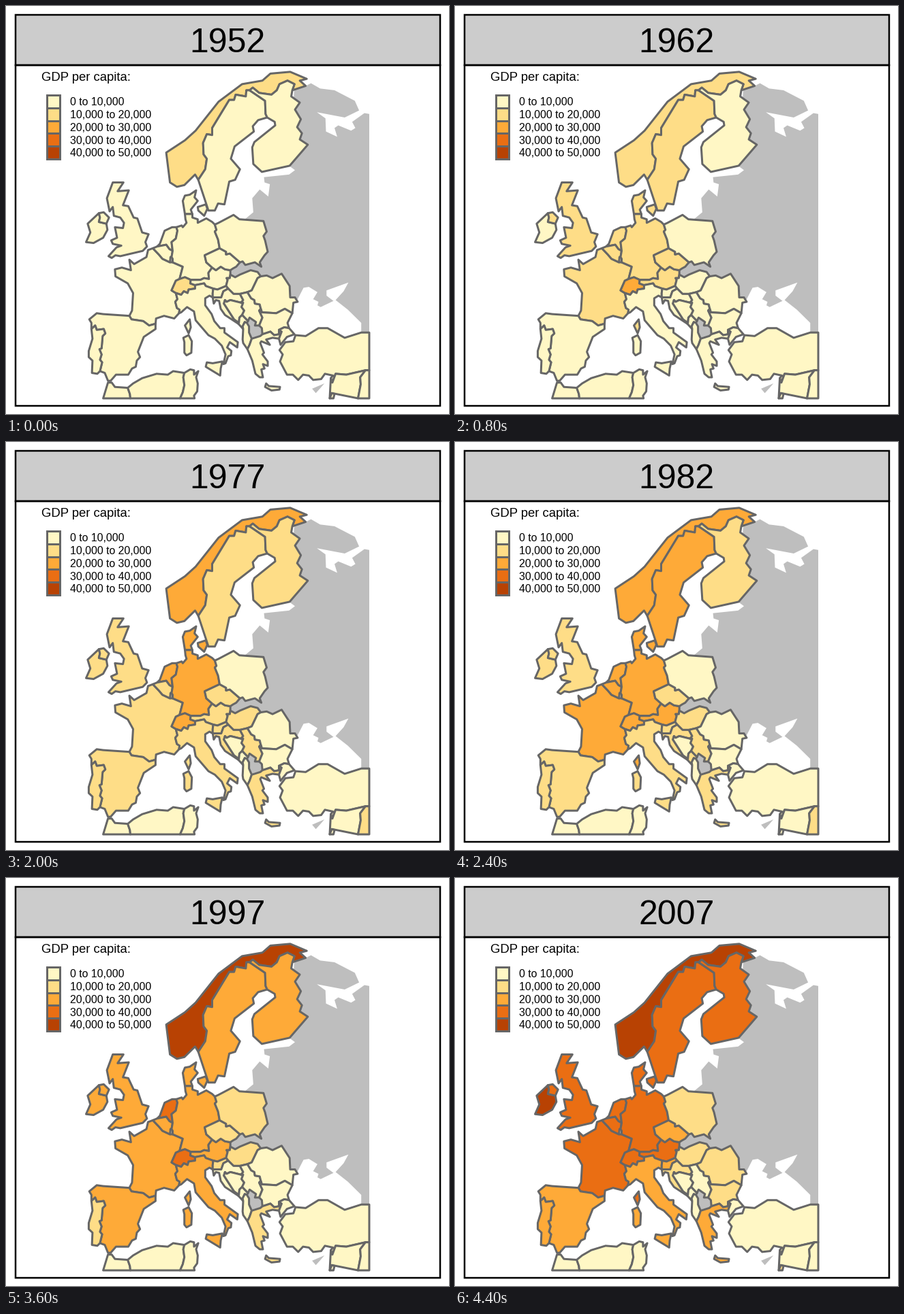
A matplotlib script for the animation above (4800 ms loop, 650 by 600 pixels).

```python
import math

import matplotlib.pyplot as plt
from matplotlib.animation import FuncAnimation
from matplotlib.patches import Polygon, Rectangle

W, H, DPI = 650, 600, 100
PT = 72 / DPI  # points per pixel
YEARS = range(1952, 2008, 5)
STEP = 10000
SHADES = ["#FFF7C5", "#FEDD87", "#FEAA38", "#EA6E13", "#B84203"]
NO_DATA, BORDER = "#BEBEBE", "#666666"

# Plate carree map, cropped at 43 E and 34 N
EAST, SOUTH = 43, 34
LON_PX = 7.84
LAT_PX = LON_PX / math.cos(math.radians(52.6))

plt.rcParams["font.family"] = "Liberation Sans"
fig = plt.figure(figsize=(W / DPI, H / DPI), dpi=DPI, facecolor="white")
ax = fig.add_axes([0, 0, 1, 1])
ax.set_xlim(0, W)
ax.set_ylim(H, 0)
ax.axis("off")

countries = []


def line(*coords):
    """Key points, given as longitude and latitude, in pixels."""
    return [(533 + LON_PX * (lon - EAST), 577 - LAT_PX * (lat - SOUTH))
            for lon, lat in zip(coords[::2], coords[1::2])]


def ring(first, *rest):
    """Chain lines end to end, turning each one to fit."""
    if rest:
        ends = rest[0][0], rest[0][-1]
        gap = [min(math.dist(p, q) for q in ends) for p in (first[0], first[-1])]
        first = first[::-1] if gap[0] < gap[1] else first
    points = list(first)
    for part in rest:
        tail = points[-1]
        back = math.dist(tail, part[-1]) < math.dist(tail, part[0])
        points += part[::-1] if back else part
    return points


def land(*lines):
    ax.add_patch(Polygon(ring(*lines), facecolor=NO_DATA, linewidth=0, zorder=1))


def country(rises, *lines, falls=()):
    """Land that moves up one class in each year of rises, down in falls."""
    patch = Polygon(ring(*lines), edgecolor=BORDER, linewidth=3 * PT,
                    joinstyle="round", zorder=2)
    ax.add_patch(patch)
    countries.append((patch, rises, falls))


def text(x, y, label, size, **align):
    return ax.text(x, y, label, fontsize=size * PT, va="baseline", zorder=5, **align)


def box(x, y, w, h, face, edge, width):
    ax.add_patch(Rectangle((x, y), w, h, facecolor=face, edgecolor=edge,
                           linewidth=width * PT, zorder=4))


# Land without data runs on beneath its coloured neighbours
land(line(29, 69.5, 31.1, 69.6, 32.1, 69.9, 33.8, 69.3, 36.5, 69.1, 40.3, 67.9,
          41.1, 66.8, 38.4, 66, 33.2, 66.6, 34.8, 65.9, 34.9, 64.4, 37, 63.8,
          36.5, 64.8, 37.2, 65.1, 39.6, 64.5, 40.4, 64.8, 39.8, 65.5, 42.1, 66.5,
          EAST, 66.4, EAST, 41.5, 41.5, 41.5, 41.5, 42.6, 39, 44.1, 36.7, 45.2,
          38.2, 46.2, 39.1, 47.2, 35, 46.3, 35, 45.7, 36.3, 45.1, 33.9, 44.4,
          33.3, 44.6, 33.5, 45, 32.5, 45.3, 33.3, 46.1, 31.7, 46.7, 30.7, 46.6,
          29.6, 45.3, 25, 46, 20, 47, 16.5, 48.3, 19.7, 54.4, 21.3, 55.2,
          21.1, 56.8, 22.5, 57.8, 24.1, 57, 24.4, 58.4, 23.4, 58.6, 23.3, 59.2,
          28, 59.5, 29.1, 60, 28, 60.5))
land(line(20.2, 42.7, 21, 43.2, 23, 41.9, 23, 41.2, 20.8, 40.9))
land(line(5.6, 49.5, 6, 50.2, 6.3, 49.4))
land(line(32.3, 35.1, 34.6, 35.7, 33.9, 35.2, 33, 34.6))

# Northern Europe
no_se = line(11, 58.9, 12.3, 60.1, 12.6, 61.3, 12, 61.8, 11.9, 63.1, 12.6, 64.1,
             13.6, 64, 13.6, 64.8, 16.1, 67.3, 16.8, 68, 17.7, 68, 18, 68.6,
             19.9, 68.4, 20, 69.1, 20.6, 69.1)
no_fi = line(20.6, 69.1, 21.2, 69.4, 22.4, 68.8, 24.7, 68.6, 25.7, 69.1,
             26.2, 69.8, 27.7, 70.2, 29, 69.8, 28.6, 69.1)
se_fi = line(20.6, 69.1, 23.5, 67.9, 23.6, 66.4, 23.9, 66)
no_sea = line(28.6, 69.1, 31.1, 69.6, 30, 70.2, 31.3, 70.4, 28.2, 71.2, 24.5, 71,
              23, 70.2, 19.2, 69.8, 14.8, 67.8, 10.5, 64.5, 8.5, 63.4, 5, 62,
              5.7, 58.6, 7, 58.1, 8.4, 58.3, 10.4, 59.5, 11, 58.9)
se_sea = line(23.9, 66, 22.2, 65.7, 21.2, 65, 21.4, 64.4, 17.8, 62.7, 17.1, 61.3,
              18.8, 60.1, 17.9, 58.9, 16.8, 58.7, 15.9, 56.1, 14.7, 56.2,
              14.1, 55.4, 12.9, 55.4, 11, 58.9)
fi_rest = line(23.9, 66, 25.3, 65.5, 25.4, 65.1, 21.5, 63.2, 21.1, 62.6,
               21.3, 60.7, 22.9, 59.8, 28.1, 60.5, 31.5, 62.9, 30, 63.5,
               30.4, 64.2, 29.5, 64.9, 30.2, 65.8, 29.1, 66.9, 30, 67.7,
               28.4, 68.4, 28.6, 69.1)
country([1952, 1977, 1987, 1997], no_se, no_fi, no_sea)
country([1962, 1982, 2007], no_se, se_fi, se_sea)
country([1967, 1987, 2007], no_fi, fi_rest, se_fi)

de_dk = line(8.5, 55, 9.9, 55)
country([1957, 1977, 2002], de_dk,
        line(9.6, 55.5, 10.9, 56.5, 10.3, 56.9, 10.6, 57.7, 9.4, 57.2,
             8.5, 57.1, 8.1, 56.5))
country([1957, 1977, 2002], line(12.7, 55.6, 12.1, 54.8, 11, 55.4, 10.9, 55.8,
                                 12.4, 56.1))
country([1957, 1987, 2007],
        line(-3, 58.6, -4.1, 57.6, -2, 57.7, -3.1, 56, -2.1, 55.9, -1.1, 54.6,
             -0.4, 54.5, 0.5, 52.9, 1.7, 52.7, 1.1, 51.8, 1.4, 51.3, 0.6, 50.8,
             -3.6, 50.2, -4.5, 50.3, -5.2, 50, -5.8, 50.2, -4.3, 51.2, -3.4, 51.4,
             -5, 51.6, -5.3, 52, -4.2, 52.3, -4.6, 53.5, -3.1, 53.4, -2.9, 54,
             -3.6, 54.6, -4.8, 54.8, -5, 55.8, -5.6, 55.3, -6.1, 56.8, -5, 58.6))
ie_uk = line(-7.6, 55.1, -7.4, 54.6, -7.6, 54.1, -6.2, 53.9)
country([1977, 1997, 2002, 2007], ie_uk,
        line(-6, 53.2, -6.8, 52.3, -8.6, 51.7, -10, 51.8, -9.2, 52.9, -9.7, 53.9))
country([1957, 1987, 2007], ie_uk, line(-5.7, 54.6, -6.7, 55.2, -7.6, 55.1))

# Western Europe
be_fr = line(2.5, 51.1, 3.6, 50.4, 4.3, 49.9, 5.7, 49.5)
be_nl = line(3.3, 51.3, 5, 51.5, 5.6, 51, 6.2, 50.8)
be_de = line(6.2, 50.8, 6, 50.1)
de_nl = line(6.2, 50.8, 6, 51.8, 6.8, 52.2, 7.1, 53.1, 6.9, 53.5)
de_fr = line(6.2, 49.5, 8.1, 49, 7.5, 47.6)
ch_fr = line(7.5, 47.6, 6.8, 47.4, 6, 46.3, 6.8, 46)
fr_it = line(6.8, 46, 7.1, 45.3, 6.7, 45, 7, 44.3, 7.5, 44.1, 7.4, 43.7)
es_fr = line(3, 42.5, 1.8, 42.3, 0.7, 42.8, -1.5, 43, -1.9, 43.4)
country([1962, 1982, 2007], be_fr, de_fr, ch_fr, fr_it,
        line(6.5, 43.1, 4.6, 43.4, 3.1, 43.1), es_fr,
        line(-1.4, 44, -1.2, 46, -2.2, 47.1, -4.5, 47.9, -4.6, 48.7, -3.3, 48.9,
             -1.6, 48.6, -1.9, 49.8, -1, 49.3, 1.3, 50.1, 1.6, 50.9))
country([1962, 1982, 2007], line(9.6, 42.1, 9.2, 41.4, 8.5, 42.3, 9.4, 43))
country([1957, 1977, 1997], be_nl, de_nl, line(6.1, 53.5, 4.7, 53.1, 3.8, 51.6))
country([1962, 1982, 2002], be_nl, be_de, line(5.8, 50.1, 5.7, 49.5), be_fr)

# Iberia
es_pt = line(-7.4, 37.1, -7, 38.1, -7.4, 38.4, -7.1, 39, -7.5, 39.6, -7.1, 39.7,
             -6.9, 41.1, -6.4, 41.4, -6.7, 41.9, -8, 41.8, -8.3, 42.3, -9, 41.9)
country([1972, 1997], es_pt,
        line(-9, 42.6, -9.4, 43, -8, 43.7, -6.8, 43.6, -1.9, 43.4), es_fr,
        line(3, 41.9, 0.8, 41, -0.3, 39.3, 0.1, 38.7, -0.5, 38.3, -0.7, 37.6,
             -1.4, 37.4, -2.1, 36.7, -4.4, 36.7, -5.4, 36, -5.9, 36, -6.5, 36.9))
country([1977, 2007], es_pt,
        line(-8.8, 40.8, -9.5, 39.4, -9.5, 38.7, -8.8, 38.3, -8.9, 36.9, -7.9, 36.8))

# Central Europe
de_pl = line(14.1, 53.8, 14.4, 53.2, 14.1, 53, 14.7, 52.1, 15, 51.1)
cz_de = line(15, 51.1, 12.2, 50.3, 12.5, 49.5, 13.6, 48.9)
at_de = line(13.6, 48.9, 12.9, 48.3, 13, 47.6, 12.1, 47.7, 11.4, 47.5, 9.6, 47.5)
ch_de = line(9.6, 47.5, 8.5, 47.8, 7.5, 47.6)
at_ch = line(9.6, 47.5, 9.5, 47.1, 10.4, 46.9)
ch_it = line(10.4, 46.9, 10.4, 46.5, 9.2, 46.4, 9, 46, 8.3, 46.2, 7.8, 45.8, 6.8, 46)
at_it = line(10.4, 46.9, 12.1, 47.1, 12.4, 46.8, 13.8, 46.5)
at_si = line(13.8, 46.5, 14.6, 46.4, 16.2, 46.8)
at_hu = line(16.2, 46.8, 16.5, 47.5, 16.3, 47.7, 16.9, 47.7, 17, 48.1)
at_cz = line(17, 48.6, 16, 48.7, 15.2, 49, 14.3, 48.6, 13.6, 48.9)
cz_pl = line(15, 51.1, 16.2, 50.7, 16.2, 50.4, 16.9, 50.5, 18.8, 49.5)
country([1957, 1977, 2002], de_nl, be_de, line(6.2, 49.9, 6.2, 49.5), de_fr,
        ch_de, at_de, cz_de, de_pl,
        line(13.6, 54.1, 12.5, 54.5, 10.9, 54, 10.9, 54.4, 9.9, 54.6), de_dk,
        line(8.6, 54.4, 8.8, 54, 8.1, 53.5, 7.9, 53.7))
country([1952, 1962, 1987], ch_fr, ch_it, at_ch, ch_de)
country([1962, 1982, 2002], at_de, at_ch, at_it, at_si, at_hu, at_cz)
country([1962, 2007], cz_de, at_cz, line(17.5, 48.8, 18.1, 49, 18.8, 49.5), cz_pl)
country([1997], de_pl, cz_pl,
        line(19.3, 49.6, 19.8, 49.2, 21.6, 49.5, 22.8, 49, 22.5, 49.5, 23.4, 50.3,
             24, 50.7, 23.5, 52, 23.2, 52.5, 23.8, 53, 23.2, 54.2, 18.7, 54.4,
             17.6, 54.9, 14.8, 54))

# Italy and its islands
it_si = line(13.8, 46.5, 13.7, 46, 13.7, 45.5)
country([1967, 1992], fr_it, ch_it, at_it, it_si,
        line(13.1, 45.7, 12.3, 45.4, 12.3, 44.6, 13.5, 43.6, 14, 42.8, 15.1, 42,
             15.9, 42, 15.9, 41.5, 18.4, 40.4, 18.3, 39.8, 16.9, 40.4, 16.4, 39.8,
             17.2, 39.4, 17.1, 38.9, 16.6, 38.8, 16.1, 38, 15.7, 37.9, 16.1, 39,
             15.4, 40, 14.1, 40.8, 12.9, 41.2, 10.5, 42.9, 10.2, 43.9, 8.9, 44.4,
             7.8, 43.8))
country([1967, 1992], line(9.2, 41.2, 9.8, 40.5, 9.7, 39.2, 8.8, 38.9, 8.4, 39.2,
                           8.4, 40.4, 8.2, 40.9))
country([1967, 1992], line(15.5, 38.2, 15.2, 37.4, 15.1, 36.6, 12.4, 37.6,
                           12.6, 38.1, 13.7, 38))

# Balkans
hr_si = line(16.6, 46.5, 15.7, 46.2, 15.3, 45.5, 14.4, 45.5, 13.7, 45.5)
hu_si = line(16.6, 46.5, 16.2, 46.8)
hr_hu = line(16.6, 46.5, 17.6, 45.9, 18.8, 45.9)
hu_rs = line(18.8, 45.9, 20.2, 46.1)
hu_ro = line(20.2, 46.1, 21, 46.3, 22.1, 47.7, 22.7, 47.9)
ba_hr = line(18.6, 42.6, 17.7, 43, 15.8, 44.8, 16, 45.2, 16.3, 45, 17, 45.2, 19, 44.9)
hr_rs = line(19, 44.9, 19.4, 45.2, 18.8, 45.9)
ba_rs = line(19, 44.9, 19.4, 44.9, 19.1, 44.4, 19.6, 44, 19.2, 43.5)
ba_me = line(19.2, 43.5, 18.7, 43.2, 18.6, 42.6)
me_rs = line(19.2, 43.5, 20.3, 42.8)
al_me = line(20.1, 42.6, 19.7, 42.7, 19.3, 42.2, 19.4, 41.9)
ro_rs = line(20.2, 46.1, 20.9, 45.4, 21.5, 45.2, 21.6, 44.8, 22.5, 44.7, 22.7, 44.2)
bg_rs = line(22.7, 44.2, 22.4, 44, 23, 43.2, 22.4, 42.3)
bg_ro = line(22.7, 44.2, 22.9, 43.8, 25.6, 43.7, 27.2, 44.2, 28.6, 43.7)
bg_gr = line(23, 41.3, 24.5, 41.6, 25.2, 41.2, 26.1, 41.3)
bg_tr = line(26.1, 41.8, 27.1, 42.1, 28, 42)
gr_tr = line(26.1, 41.8, 26.6, 41.6, 26.1, 40.8)
al_gr = line(21, 40.8, 20.6, 40.1, 20.2, 39.6)
country([1972], at_hu, hu_si, hr_hu, hu_rs, hu_ro,
        line(22.1, 48.4, 20.8, 48.6, 18.8, 48.1, 17.9, 47.8))
country([1972, 2002], at_si, hu_si, hr_si, it_si)
country([1977, 2002], hr_si, hr_hu, hr_rs, ba_hr,
        line(18.5, 42.5, 16, 43.5, 15.2, 44.2, 14.9, 45.1, 14.3, 45.2, 13.9, 44.8),
        falls=[1992])
country([], ba_hr, ba_rs, ba_me)
country([1972], hu_rs, ro_rs, bg_rs,
        line(21.6, 42.3, 21.8, 42.7, 20.6, 43.2, 20.3, 42.8), me_rs, ba_rs, hr_rs,
        falls=[1992])
country([1982], me_rs, al_me, line(18.5, 42.5), ba_me, falls=[1992])
country([], al_me, line(19.3, 40.7, 19.4, 40.3, 20.2, 39.6), al_gr,
        line(20.5, 41.5, 20.5, 42.2))
country([2007], hu_ro, ro_rs, bg_ro,
        line(28.8, 44.9, 29.6, 45, 29.1, 45.5, 28.2, 45.5, 28.1, 46.8, 26.6, 48.2,
             24.9, 47.7, 23.8, 48))
country([2007], bg_ro, bg_rs, line(22.9, 42, 23, 41.3), bg_gr, bg_tr,
        line(27.7, 42.6, 28.6, 43.7))
country([1972, 2002], al_gr, line(21, 40.8, 22.6, 41.1), bg_gr, gr_tr,
        line(24.9, 40.9, 23.7, 40.7, 24.4, 40.1, 22.8, 40.5, 22.6, 40.3, 23.3, 39.2,
             23, 39, 24, 38.2, 24, 37.7, 23.1, 37.9, 23.4, 37.4, 22.8, 37.3,
             23.1, 36.4, 22.5, 36.4, 21.7, 36.8, 21.1, 38.3))
country([1972, 2002], line(23.7, 35.7, 24.2, 35.4, 26.3, 35.3, 26.2, 35, 24.7, 34.9,
                           23.5, 35.3))

# Turkey, Levant and North Africa
sy_tr = line(35.8, 36.3, 36.1, 35.8, 36.7, 36.8, 38.7, 36.7, 42.3, 37.2)
iq_sy = line(42.3, 37.2, 41.3, 36.4, 41.4, 35.6, 40.9, SOUTH)
dz_ma = line(-2.2, 35.2, -1.8, 34.5, -1.7, SOUTH)
dz_tn = line(8.4, 36.9, 8.2, 36.4, 8.4, 35.5, 8.1, 34.7, 7.6, SOUTH)
country([], gr_tr, bg_tr, line(29, 41.3, 27.6, 41, 26.4, 40.1, 26.1, 40.8))
country([], sy_tr,
        line(EAST, 37.2, EAST, 41.5, 41.5, 41.5, 38.4, 40.9, 35.2, 42, 33.5, 42,
             31.1, 41.1, 29.2, 41.2, 28.8, 40.5, 27.3, 40.4, 26.2, 39.5, 26.8, 39,
             26.3, 38.2, 27.6, 36.7, 28.7, 36.7, 29.7, 36.1, 30.6, 36.7, 31.7, 36.6,
             32.5, 36.1, 34, 36.2, 34.7, 36.8, 36.2, 36.6))
country([], sy_tr, iq_sy, line(35.6, SOUTH, 36, 34.6))
country([1977], iq_sy, line(EAST, SOUTH, EAST, 37.2), falls=[1992])
country([2007], line(36, 34.6, 36.5, 34.5, 36.3, SOUTH, 35.6, SOUTH))
country([], dz_ma, line(-6.8, SOUTH, -5.9, 35.8, -5.2, 35.8, -4.6, 35.3))
country([], dz_ma, dz_tn,
        line(6.3, 37.1, 5.3, 36.7, 3.2, 36.8, 0.5, 36.3, -1.2, 35.7))
country([], dz_tn, line(10.3, SOUTH, 10.2, 34.3, 10.8, 34.8, 10.9, 35.7, 10.6, 36.4,
                        11, 37.1, 10.2, 36.7, 10.2, 37.2, 9.5, 37.3))

# Title panel, frame and legend
box(13.5, 13, 623.3, 74, "#CCCCCC", "black", 2.5)
box(13.5, 87, 623.3, 500.7, "none", "black", 2.5)
title = text(325.3, 68, "", 50, ha="center")
text(51.5, 110, "GDP per capita:", 18.5)
for i, shade in enumerate(SHADES):
    low, high = i * STEP, (i + 1) * STEP
    y = 131 + 18.75 * i
    box(60, y, 19, 18.75, shade, BORDER, 3)
    text(93.5, y + 15.3, f"{low:,} to {high:,}", 15.85)


def draw(frame):
    year = YEARS[frame]
    title.set_text(str(year))
    for patch, rises, falls in countries:
        level = sum(y <= year for y in rises) - sum(y <= year for y in falls)
        patch.set_facecolor(SHADES[level])
    return [title]


anim = FuncAnimation(fig, draw, frames=len(YEARS), interval=400,
                     repeat=True, repeat_delay=0)
plt.show()
```
